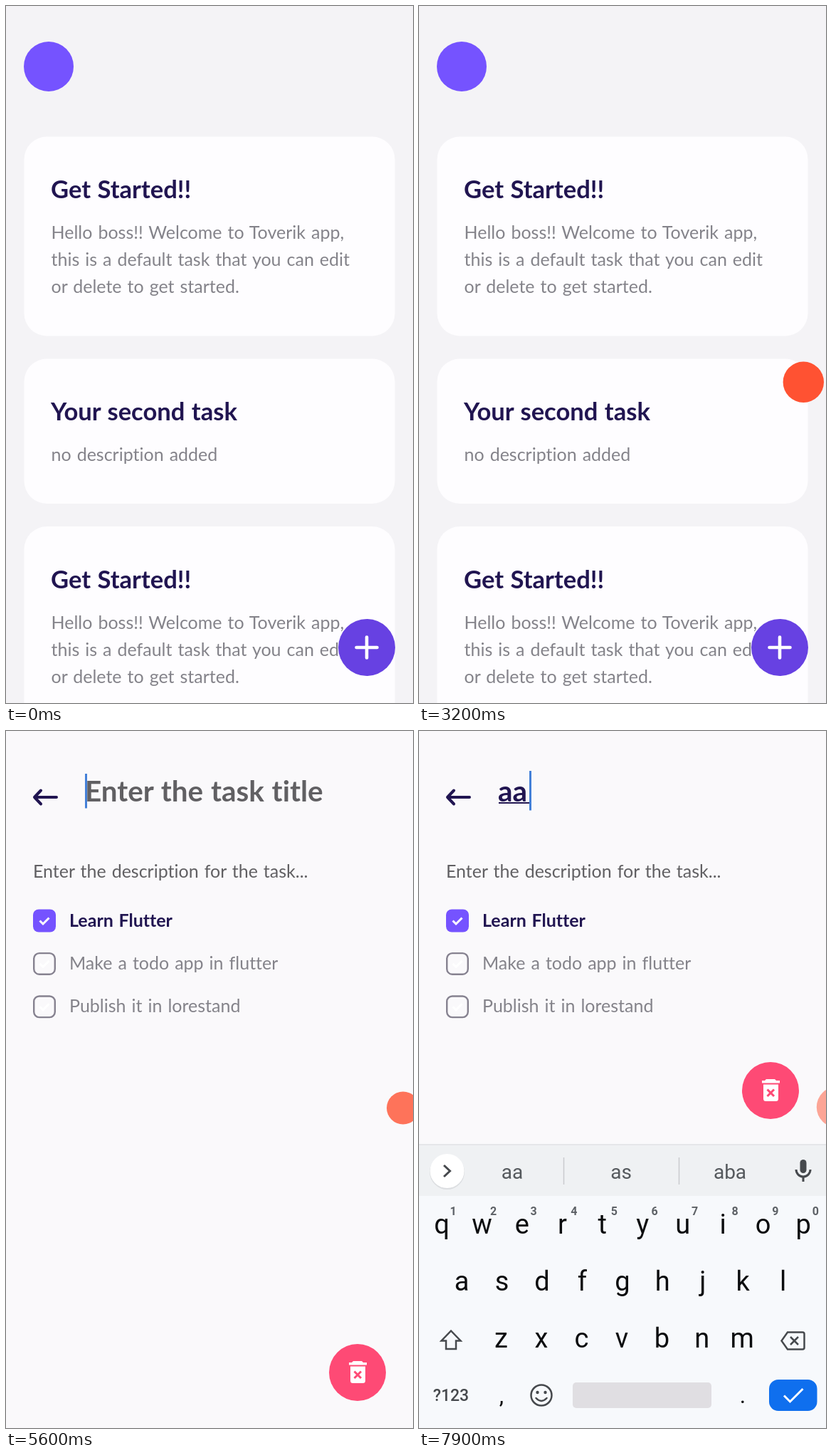
An HTML page for the animation above (8 s loop, 572 px wide and 979 px high).

```html
<!DOCTYPE html>
<html lang="en">
<head>
<meta charset="utf-8">
<title>Task app</title>
<style>
html, body { margin: 0; width: 100%; height: 100%; overflow: hidden; background: #f4f3f6 }
svg { display: block; width: 100%; height: 100% }
text { font: 25px Lato, sans-serif; font-variant-ligatures: none; word-spacing: 1.6px; fill: #84838a }
.title { font-size: 34.6px; font-weight: 700; word-spacing: 1px; fill: #211551 }
.head { font-size: 40.4px; font-weight: 700; word-spacing: 1px; fill: #616063 }
.done { font-size: 25px; font-weight: 700; fill: #211551 }
.hint { fill: #616063 }
#time { font: 14px Roboto, sans-serif; fill: #fff; text-anchor: middle }
#board text { font: 38px Roboto, sans-serif; fill: #0b0c0e; text-anchor: middle }
#board .num { font-size: 16px; font-weight: 700; fill: #5d6166 }
#board .mode { font-size: 23px; font-weight: 500; fill: #46494d }
#board .word { font-size: 28px; fill: #55595d }
#board .gif { font-size: 23px; font-weight: 900; fill: #505357 }
.line { fill: none; stroke: #46494d; stroke-width: 3 }
.round { stroke-linecap: round; stroke-linejoin: round }
.solid { fill: #46494d }
</style>
</head>
<body>
<svg viewBox="0 0 572 979" preserveAspectRatio="none">
  <rect width="572" height="979" fill="#f4f3f6"/>
  <circle cx="60" cy="85" r="35" fill="#7553ff"/>
  <g id="cards"></g>
  <circle cx="507" cy="901" r="40" fill="#6741e2"/>
  <path d="M492.500 901h29M507 886.500v29" class="round" stroke="#fff" stroke-width="4.600"/>

  <g id="page">
    <rect width="572" height="1300" fill="#faf9fb"/>
    <path d="M40 93h31M49 83.500L40 93l9 9.500" class="round" fill="none" stroke="#211551" stroke-width="4"/>
    <text id="prompt" class="head" x="111" y="98.500">Enter the task title</text>
    <g id="typed">
      <text id="entry" class="head" x="111" y="98.500" style="fill:#211551"></text>
      <rect id="under" x="112" y="100" height="2" fill="#211551"/>
    </g>
    <rect id="caret" width="3" fill="#4480d8"/>
    <text class="hint" x="38" y="206">Enter the description for the task...</text>
    <g id="todos"></g>
    <g id="bin">
      <circle cx="494" cy="901" r="40" fill="#fe4a75"/>
      <path d="M488 885h12l2 2h5v3.500h-25v-3.500h4zM484 892.500h21v20q0 3.500-3.500 3.500h-14q-3.500 0-3.500-3.500z" fill="#fff"/>
      <path d="M489.500 899.500l9.500 9.500m0-9.500l-9.500 9.500" stroke="#fe4a75" stroke-width="3"/>
    </g>
  </g>

  <g id="board">
    <rect y="581" width="572" height="400" fill="#f7f9fc"/>
    <rect y="581" width="572" height="72" fill="#eff1f3"/>
    <rect y="580" width="572" height="2" fill="#e5e6e9"/>
    <circle cx="39.500" cy="619.500" r="24.500" fill="#dcdee1"/>
    <circle cx="39.500" cy="618" r="24" fill="#fff"/>
    <path id="chevron" class="line"/>
    <g id="tools">
      <path class="line round" d="M105 607h17q3 0 3 3v12l-8 8h-12q-3 0-3-3v-17q0-3 3-3zM117 630v-5q0-3 3-3h5"/>
      <path class="line round" d="M107 619q5 7 12 1" style="stroke-width:2.500"/>
      <circle class="solid" cx="109" cy="614" r="2"/><circle class="solid" cx="118" cy="614" r="2"/>
      <text class="gif" x="194" y="626">GIF</text>
      <rect class="line" x="264.500" y="607.500" width="22" height="24" rx="2"/>
      <path class="solid" d="M269 606h3.500a3 3 0 0 1 6 0h3.500v6h-13z"/>
      <path class="line" d="M269 616h13M269 621h13M269 626h9" style="stroke-width:2.500"/>
      <circle class="line" cx="357" cy="619" r="7.500" style="stroke-width:6.500"/>
      <circle class="line" cx="357" cy="619" r="11.500" pathLength="12" stroke-dasharray="1" stroke-dashoffset=".5" style="stroke-width:4"/>
      <path d="M407.500 600v36" stroke="#cfd1d4" stroke-width="1.500"/>
      <circle class="solid" cx="449" cy="618" r="3"/><circle class="solid" cx="458.500" cy="618" r="3"/><circle class="solid" cx="468.500" cy="618" r="3"/>
    </g>
    <g id="words">
      <path d="M203.500 599v38M365.500 599v38" stroke="#c9cbce" stroke-width="1.500"/>
      <text id="guess" class="word" x="131" y="629"></text>
      <text class="word" x="284" y="629">as</text>
      <text class="word" x="437" y="629">aba</text>
    </g>
    <rect class="solid" x="535.500" y="602" width="9" height="19" rx="4.500"/>
    <path class="line" d="M530 616a10 10 0 0 0 20 0M540 626v7"/>
    <g id="keys"></g>
    <path class="line" d="M45 842.500l13.500 14h-6.500v11.500h-14v-11.500h-6.500z" style="stroke-width:2.500"/>
    <path class="line" d="M518 844.500h21q2.500 0 2.500 2.500v19q0 2.500-2.500 2.500h-21l-8.500-12zM522 851l11 11m0-11l-11 11" style="stroke-width:2.500"/>
    <text class="mode" x="45" y="941">?123</text>
    <text x="116" y="944" style="font-size:32px">,</text>
    <circle class="line" cx="172" cy="933" r="14.500" style="stroke-width:2.500"/>
    <circle class="solid" cx="166.500" cy="929" r="2.200"/><circle class="solid" cx="177.500" cy="929" r="2.200"/>
    <path class="line round" d="M164.500 937q7.500 8 15 0" style="stroke-width:2.500"/>
    <rect x="216" y="915" width="195" height="36" rx="5" fill="#e0dee2"/>
    <text x="455" y="944" style="font-size:32px">.</text>
    <rect x="492" y="911" width="67.500" height="44" rx="13" fill="#0f6fee"/>
    <path d="M513 933.500l8.500 8.500 18-18" fill="none" stroke="#fff" stroke-width="3"/>
  </g>

  <circle id="ball" fill="#ff5232"/>
  <text id="time" x="540" y="945"></text>
</svg>
<script>
const $ = id => document.getElementById(id);
const text = (cls, x, y, s) => `<text class="${cls}" x="${x}" y="${y}">${s}</text>`;
const show = (id, on) => $(id).style.display = on ? '' : 'none';
const set = (id, attrs) => { for (const k in attrs) $(id).setAttribute(k, attrs[k]); };

const welcome = ['Hello boss!! Welcome to Toverik app,', 'this is a default task that you can edit', 'or delete to get started.'];
const card = (y, h, title, lines) =>
  `<rect x="25.500" y="${y}" width="521" height="${h}" rx="32" fill="#fefdff"/>` +
  text('title', 63, y + 86.5, title) +
  lines.map((s, i) => text('', 63.5, y + 143.5 + 38.2 * i, s)).join('');
$('cards').innerHTML = card(183.5, 280, 'Get Started!!', welcome) +
  card(495.5, 203.5, 'Your second task', ['no description added']) +
  card(731, 280, 'Get Started!!', welcome);

$('todos').innerHTML = ['Learn Flutter', 'Make a todo app in flutter', 'Publish it in lorestand'].map((s, i) => {
  const y = 250.5 + 60.4 * i, done = i == 0;
  const box = done
    ? `<rect x="38" y="${y}" width="32" height="32" rx="8" fill="#7553ff"/>`
    : `<rect x="39.200" y="${y + 1.2}" width="29.600" height="29.600" rx="7.500" fill="none" stroke="#868290" stroke-width="2.400"/>`;
  const tick = `<path d="M47.500 ${y + 16}l4.500 4.500 8.500-8.500" fill="none" stroke="#fff" stroke-width="3"/>`;
  return box + tick + text(done ? 'done' : '', 89, y + 24, s);
}).join('');

const pitch = 56.45;
$('keys').innerHTML = [['qwertyuiop', 32, 706], ['asdfghjkl', 60, 786], ['zxcvbnm', 115.5, 866]].map(([row, x, y]) =>
  [...row].map((c, i) => text('', x + pitch * i, y, c)).join('')).join('') +
  [...'1234567890'].map((c, i) => text('num', 48 + 56.6 * i, 680, c)).join('');

// recorder ball: time, x, y, radius, opacity
const track = [
  [50, 540.3, 939.3, 10, 0], [400, 540.3, 939.3, 28.7, 1], [2400, 540.3, 939.3, 28.7, 1],
  [2500, 547, 740, 28.7, 1], [2600, 547, 740, 28.7, 1], [2700, 544, 590, 28.7, 1],
  [2800, 540.3, 528.2, 28.7, 1], [4850, 540.3, 528.2, 28.7, 1], [5200, 558, 529.5, 23, .8],
  [7550, 558, 529.5, 23, .8], [7900, 587.5, 528.2, 28.7, .5], [8000, 587.5, 528.2, 28.7, .5]
];
const ramp = (t, a, b) => Math.min(1, Math.max(0, (t - a) / (b - a)));
const easeOut = p => 1 - (1 - p) ** 3;
const within = (t, a, b) => t >= a && t < b;

function ballAt(t) {
  const i = Math.max(1, track.findIndex(k => t < k[0]));
  const a = track[i - 1], b = track[i], p = ramp(t, a[0], b[0]);
  return a.map((v, j) => v + (b[j] - v) * p);
}

function draw(t) {
  const [, cx, cy, r, opacity] = ballAt(t);
  set('ball', { cx, cy, r, opacity });
  $('time').textContent = '00:0' + (t < 900 ? 0 : t < 1900 ? 1 : 2);
  set('time', { opacity: t < 2250 ? opacity : 0 });

  const open = ramp(t, 3850, 4250);
  show('page', open > 0);
  set('page', { opacity: open ** 1.7, transform: `translate(0 ${245 * (1 - easeOut(open))})` });

  const rise = easeOut(ramp(t, 5850, 6250));
  show('board', rise > 0);
  set('board', { transform: `translate(0 ${399 * (1 - rise)})` });
  set('bin', { transform: `translate(0 ${-396 * rise})` });

  const n = t < 6600 ? 0 : t < 7000 ? 1 : 2, typed = 'a'.repeat(n);
  show('prompt', !n);
  show('typed', n);
  show('tools', !n);
  show('words', n);
  $('entry').textContent = $('guess').textContent = typed;
  set('under', { width: 21.5 * n });
  set('chevron', { d: n ? 'M35 610l8.500 8-8.500 8' : 'M44 610l-8.500 8 8.500 8' });
  set('caret', n ? { x: 112 + 21.5 * n, y: 56, height: 55.5 } : { x: 111, y: 60, height: 48.5 });
  show('caret', t >= 5350 && !within(t, 5850, 6250) && !within(t, 7550, 7850));
}

const start = performance.now();
function frame(now) {
  draw(Math.max(0, now - start) % 8000);
  requestAnimationFrame(frame);
}
draw(0);
requestAnimationFrame(frame);
</script>
</body>
</html>
```
